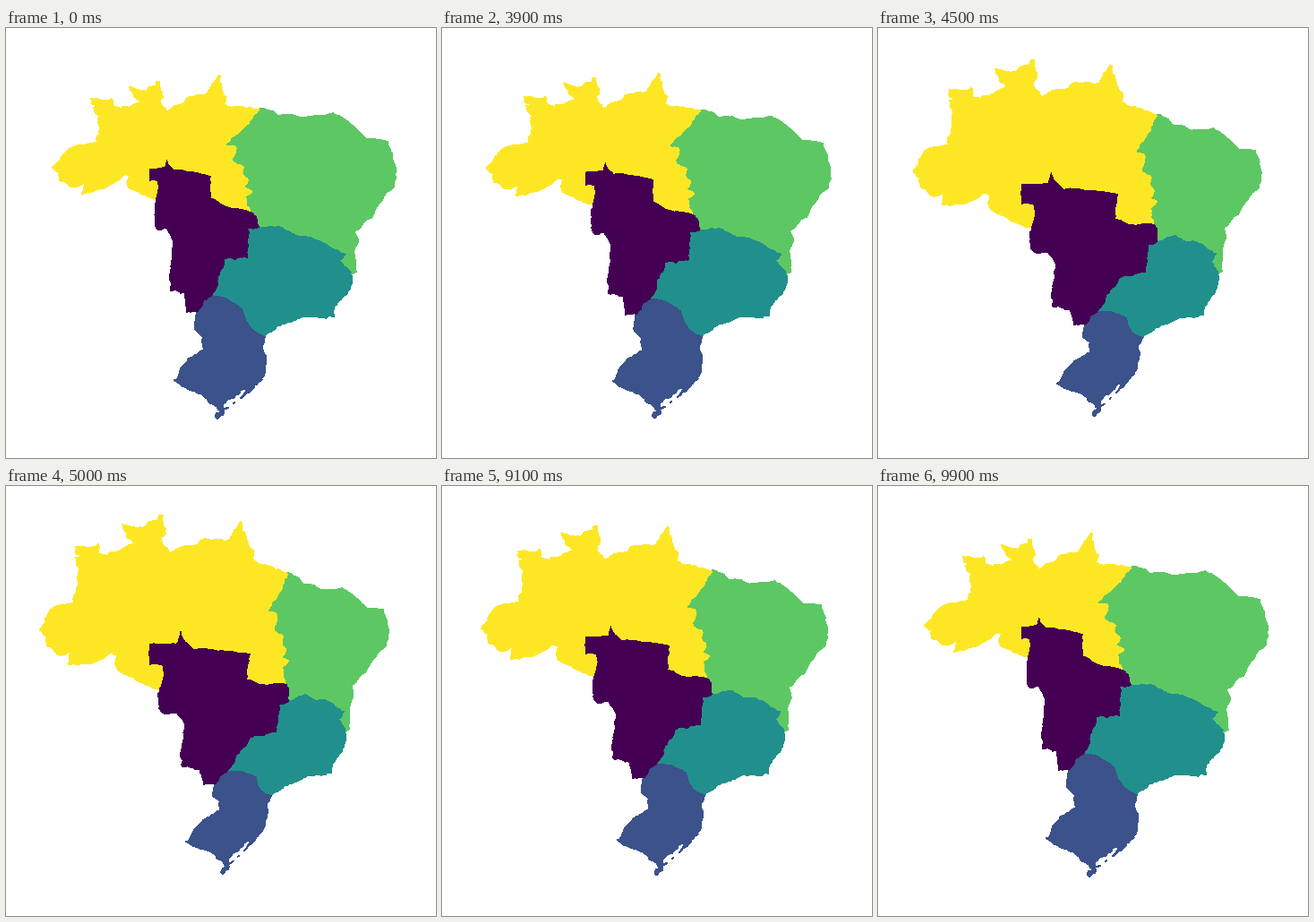
Animation, 480 px wide and 480 px high, one loop 10 s. Source, as a matplotlib script:

```python
import numpy as np
import matplotlib.pyplot as plt
from matplotlib.animation import FuncAnimation
from matplotlib.patches import Polygon

SIZE, DPI = 480, 100
FRAMES, STEP = 100, 100
HOLD, TWEEN = 33, 17
rng = np.random.default_rng(7)


def rough(p, q, amount):
    """Jagged line from p up to, but without, q by midpoint displacement."""
    d = q - p
    length = np.hypot(*d)
    if length < 3.2:
        return [p]
    side = np.array([-d[1], d[0]]) / length
    shift = np.clip(rng.normal(0, amount * length), -1.3, 1.3)
    mid = (p + q) / 2 + side * shift
    return rough(p, mid, amount) + rough(mid, q, amount)


def arc(*knots, amount=0.12):
    pts = np.array(knots, float)
    rows = []
    for p, q in zip(pts, pts[1:]):
        rows += rough(p, q, amount)
    return np.array(rows + [pts[-1]])


def ring(*arcs):
    return np.concatenate([a[:-1] for a in arcs])


def kernel(a, b):
    r2 = ((a[:, None] - b[None]) ** 2).sum(-1)
    return r2 * np.log(r2 + 1e-9)


def affine(p):
    return np.column_stack([np.ones(len(p)), p])


def thin_plate(src, dst):
    """Smooth map of the plane that takes each src point to its dst point."""
    n = len(src)
    m = np.zeros((n + 3, n + 3))
    m[:n, :n] = kernel(src, src)
    m[:n, n:] = affine(src)
    m[n:, :n] = affine(src).T
    w = np.linalg.solve(m, np.vstack([dst, np.zeros((3, 2))]))
    return lambda p: kernel(p, src) @ w[:n] + affine(p) @ w[n:]


# Anchors: place on the true map, then on the cartogram
ANCHORS = np.array([
    (315, 97, 284, 90), (313, 222, 275, 207), (315, 240, 282, 222),
    (378, 275, 384, 275), (246, 319, 229, 299), (296, 346, 289, 345),
    (234, 332, 214, 316), (172, 226, 168, 190), (38, 161, 52, 156),
    (262, 40, 238, 53), (171, 33, 168, 60), (78, 68, 95, 79),
    (76, 131, 102, 128), (70, 199, 85, 185), (124, 188, 138, 164),
    (161, 177, 161, 158), (272, 188, 228, 166), (294, 139, 247, 130),
    (375, 114, 365, 95), (427, 163, 435, 158), (386, 222, 389, 226),
    (363, 320, 366, 322), (291, 370, 290, 375), (201, 397, 188, 393),
    (242, 433, 236, 436), (239, 360, 221, 357), (197, 313, 184, 293),
    (174, 252, 168, 223), (301, 274, 269, 256), (334, 233, 305, 222),
    (182, 74, 179, 93)], float)
warp = thin_plate(ANCHORS[:, :2], ANCHORS[:, 2:])

# Points where areas meet each other or the outer edge
N_NE, N_NE_CW, NE_CW_SE, NE_SE = (315, 97), (313, 222), (315, 240), (378, 275)
CW_SE_S, SE_S, CW_S, N_CW = (246, 319), (296, 346), (234, 332), (172, 226)

# Outer edge, clockwise
north = arc(
    N_CW, (166, 226), (153, 220), (141, 213), (129, 208), (123, 201),
    (124, 188), (117, 186), (97, 197), (88, 198), (70, 199), (71, 185),
    (61, 189), (46, 178), (46, 169), (38, 161), (44, 148), (49, 139),
    (60, 133), (76, 131), (82, 92), (78, 80), (86, 78), (78, 75), (78, 68),
    (90, 69), (103, 65), (104, 76), (112, 78), (128, 72), (144, 64),
    (135, 57), (130, 43), (140, 46), (153, 47), (160, 40), (169, 39),
    (171, 33), (175, 33), (178, 53), (173, 58), (182, 74), (190, 71),
    (214, 66), (217, 61), (246, 62), (254, 53), (262, 40), (268, 60),
    (276, 72), (276, 83), (293, 90), N_NE)
ne_coast = arc(
    N_NE, (327, 103), (331, 109), (340, 110), (352, 116), (375, 114),
    (395, 129), (403, 137), (421, 138), (427, 163), (424, 178), (407, 197),
    (401, 208), (386, 222), (386, 238), (383, 271), NE_SE, amount=0.06)
se_coast = arc(
    NE_SE, (379, 284), (375, 296), (367, 306), (363, 320), (337, 323),
    (316, 332), SE_S, amount=0.09)
s_coast = arc(
    SE_S, (291, 354), (291, 370), (288, 381), (270, 402), (248, 422),
    (248, 428), (242, 433), (240, 431), (246, 424), (243, 420), (223, 406),
    (201, 397), (216, 378), (226, 370), (239, 363), (239, 352), (231, 346),
    CW_S)
cw_west = arc(
    CW_S, (221, 333), (216, 316), (197, 313), (195, 298), (200, 268),
    (191, 253), (174, 252), (170, 234), N_CW)

# Shared borders
n_cw = arc(
    N_CW, (177, 210), (175, 200), (161, 199), (161, 177), (192, 176),
    (195, 163), (199, 173), (209, 183), (272, 188), (268, 216), (285, 222),
    (300, 221), N_NE_CW, amount=0.05)
n_ne = arc(
    N_NE, (306, 120), (294, 139), (302, 140), (304, 150), (301, 161),
    (311, 169), (310, 177), (314, 184), (310, 191), (317, 196), (310, 203),
    N_NE_CW)
ne_cw = arc(N_NE_CW, NE_CW_SE)
ne_se = arc(
    NE_CW_SE, (334, 233), (345, 240), (356, 239), (377, 252), (371, 260),
    (374, 266), NE_SE)
cw_se = arc(
    NE_CW_SE, (304, 244), (303, 264), (301, 274), (272, 281), (260, 298),
    CW_SE_S)
s_se = arc(CW_SE_S, (263, 319), (279, 325), (284, 340), SE_S, amount=0.07)
cw_s = arc(CW_SE_S, (239, 323), CW_S)
lagoon = arc((270, 398), (264, 409), (250, 419), (255, 411), (267, 400),
             (270, 398), amount=0.2)

AREAS = [
    (ring(north, n_ne, n_cw[::-1]), "#FDE725"),
    (ring(ne_coast, ne_se[::-1], ne_cw[::-1], n_ne[::-1]), "#5DC863"),
    (ring(se_coast, s_se[::-1], cw_se[::-1], ne_se), "#21908C"),
    (ring(s_coast, cw_s[::-1], s_se), "#3B528B"),
    (ring(cw_west, n_cw, ne_cw, cw_se, cw_s), "#440154"),
    (lagoon, "white"),
]

fig = plt.figure(figsize=(SIZE / DPI, SIZE / DPI), dpi=DPI, facecolor="white")
ax = fig.add_axes([0, 0, 1, 1])
ax.set_xlim(0, SIZE)
ax.set_ylim(SIZE, 0)
ax.axis("off")

shapes = []
for pts, color in AREAS:
    shape = Polygon(pts, closed=True, facecolor=color, edgecolor=color,
                    linewidth=0.3, antialiased=False, snap=False)
    shapes.append((ax.add_patch(shape), warp(pts), pts))


def ease(u):
    return 4 * u ** 3 if u < 0.5 else 1 - 4 * (1 - u) ** 3


def progress(k):
    """0 is the cartogram, 1 the true map; out and back with equal holds."""
    out = np.clip((k - HOLD) / TWEEN, 0, 1)
    back = np.clip((FRAMES - k) / TWEEN, 0, 1)
    return ease(min(out, back))


def draw(k):
    t = progress(k)
    for shape, bent, true in shapes:
        shape.set_xy(bent * (1 - t) + true * t)
    return [s[0] for s in shapes]


anim = FuncAnimation(fig, draw, frames=FRAMES, interval=STEP,
                     repeat=True, repeat_delay=0)
plt.show()
```
